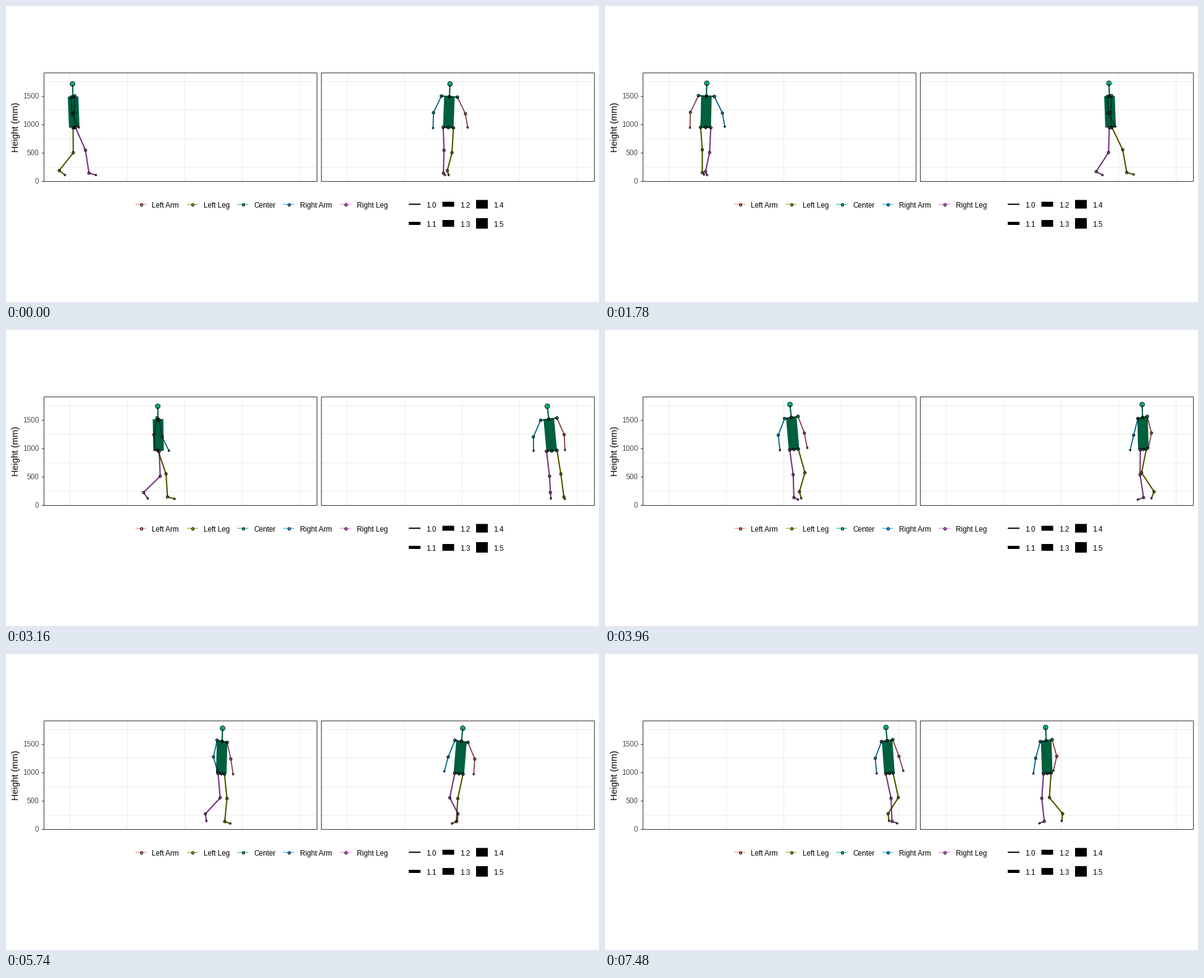
A matplotlib script that plays this animation: 960x480 px, repeating every 7500 ms.

```python
import numpy as np
import matplotlib.pyplot as plt
from matplotlib.animation import FuncAnimation
from matplotlib.collections import LineCollection
from matplotlib.patches import Rectangle

W, H, FRAMES, STEP = 960, 480, 375, 20
PX = 0.72  # points per pixel at 100 dpi
plt.rcParams["font.family"] = "Liberation Sans"

COLORS = {"Left Arm": "#F8766D", "Left Leg": "#A3A500", "Center": "#00BF7D",
          "Right Arm": "#00B0F6", "Right Leg": "#E76BF3"}

# Waypoints: seconds, x in left panel, x in right panel, heading, strides walked
WALK = np.array([(0, 110, 715.5, 13, 0.04), (1.78, 162.5, 818, 76, 1.51),
                 (3.16, 246.5, 883, 7, 2.58), (3.96, 305.5, 871, -55, 3.22),
                 (5.04, 328, 786, -87, 4.09), (6.42, 393, 711, 6, 5.22),
                 (7.48, 460, 715.5, -44, 6.16)])
SPEED = 80  # pixels per second
THIGH, SHANK, FOOT = 40.5, 37.5, 12
UPPER_ARM, FOREARM = 27, 25  # drop of the hanging arm
T = np.arange(FRAMES) * STEP / 1000


def curve(vs, slopes=None):
    """Cubic Hermite through the waypoint times."""
    ts = WALK[:, 0]
    m = np.gradient(vs, ts) if slopes is None else slopes
    i = np.clip(np.searchsorted(ts, T, side="right") - 1, 0, len(ts) - 2)
    h = ts[i + 1] - ts[i]
    u = (T - ts[i]) / h
    a = u * u * (3 - 2 * u)
    return (vs[i] * (1 - a) + vs[i + 1] * a
            + h * u * (1 - u) * (m[i] * (1 - u) - m[i + 1] * u))


def wave(phase, n=1):
    return np.cos(2 * np.pi * n * phase)


def drop(length, reach):
    """Height spanned by a rigid bone that reaches forward."""
    return np.sqrt(np.maximum(length ** 2 - reach ** 2, 1))


turns = np.radians(WALK[:, 3])
heading, phase = curve(turns), curve(WALK[:, 4])
lean = 5 * np.tanh(np.gradient(heading, T)) - 0.5  # into the turn, to the left
cos, sin = np.cos(heading), np.sin(heading)


def place(base, fwd, left, down):
    return base + np.column_stack([fwd * cos - left * sin, fwd * sin + left * cos,
                                   down + 0 * T])


# Trunk: a path on the floor plus a bob twice per stride
bob = 1.5 * wave(phase, 2)
pelvis = np.column_stack([curve(WALK[:, 1], SPEED * np.cos(turns)),
                          curve(WALK[:, 2], SPEED * np.sin(turns)),
                          195.3 - 0.2 * T + bob])
neck = place(pelvis, -1.5, lean, -50.2 - 0.4 * T)
head = place(neck, -0.7, lean / 2, -20.5 - 0.12 * T)


def arm(side, own):
    shoulder = place(neck, 0, 13.3 * side, 0.4 * lean * side)
    swing = wave(own + 0.02)
    elbow = place(shoulder, -4.5 * swing, 12.3 * side, UPPER_ARM)
    reach = 6.5 - 5.5 * swing
    return [shoulder, elbow, place(elbow, reach, side, drop(FOREARM, reach))]


def leg(side, own):
    """One leg; its cycle starts at heel strike."""
    hip = place(pelvis, 0, 8.5 * side, 0.15 * lean * side)
    thigh = 8 + 12 * wave(own - 0.91)
    reach = -1 + 23.5 * wave(own) + 5.3 * wave(own + 0.09, 2) - thigh
    knee = place(hip, thigh, -lean, drop(THIGH, thigh))
    ankle = place(knee, reach, -lean, drop(SHANK, reach))
    pitch = np.radians(15 + 65 * np.exp(4 * (wave(own - 0.66) - 1)))
    return [hip, knee, ankle,
            place(ankle, FOOT * np.cos(pitch), 0, FOOT * np.sin(pitch))]


l_arm, r_arm = arm(1, phase + 0.5), arm(-1, phase)
l_leg, r_leg = leg(1, phase + 0.5), leg(-1, phase)

ARM, LEG, TORSO = 1.6, 2, 17
BIG, MID, SMALL = 7.6, 4.2, 2.7
segments, dots = [], []  # (joint, joint, color, width) and (joint, color, size)


def chain(name, joints, width):
    color = COLORS[name]
    segments.extend((a, b, color, width) for a, b in zip(joints, joints[1:]))
    dots.extend((j, color, MID) for j in joints[:-1])
    dots.append((joints[-1], color, SMALL))


chain("Left Arm", l_arm, ARM)
chain("Left Leg", l_leg, LEG)
green = COLORS["Center"]
segments.append((neck, pelvis, green, TORSO))
for a, b in ((head, neck), (neck, l_arm[0]), (neck, r_arm[0]),
             (pelvis, l_leg[0]), (pelvis, r_leg[0])):
    segments.append((a, b, green, LEG))
    dots.extend([(a, green, BIG if a is head else MID), (b, green, MID)])
chain("Right Arm", r_arm, ARM)
chain("Right Leg", r_leg, LEG)

lines = np.stack([np.stack([a, b], 1) for a, b, _, _ in segments], 1)
points = np.stack([d[0] for d in dots], 1)

# Stage
fig = plt.figure(figsize=(W / 100, H / 100), dpi=100, facecolor="white")
ax = fig.add_axes([0, 0, 1, 1])
ax.set(xlim=(-0.5, W - 0.5), ylim=(H - 0.5, -0.5))
ax.axis("off")


def stroke(x, y, color, width=1):
    ax.plot(x, y, color=color, lw=width * PX, zorder=1, solid_capstyle="butt", snap=False)


def label(x, y, s, color="black", size=11.73, **kw):
    ax.text(x, y, s, color=color, fontsize=size * PX, va="baseline", **kw)


TOP, BOTTOM, WIDE = 108, 284, 442
for left in (61, 510):
    for k in range(5):
        stroke([left + 42 + 93 * k] * 2, [TOP, BOTTOM], "#EBEBEB")
    for k in range(4):
        stroke([left, left + WIDE], [round(261.3 - 46.4 * k)] * 2, "#EBEBEB")
    ax.add_patch(Rectangle((left, TOP), WIDE, BOTTOM - TOP, fill=False,
                           ec="#333333", lw=PX, zorder=6, snap=False))

for k in range(4):
    y = round(284.3 - 46.2 * k)
    stroke([57.5, 61], [y, y], "#333333")
    label(53, y + 4, str(500 * k), "#4D4D4D", ha="right")
label(19.5, 196, "Height (mm)", size=14.67, rotation=90, rotation_mode="anchor", ha="center")

for (name, color), x in zip(COLORS.items(), (218, 301, 383, 457, 549)):
    stroke([x - 9, x + 9], [321, 321], color)
    ax.scatter([x], [321], s=(4.2 * PX) ** 2, c=color, ec="black", lw=PX, zorder=3)
    label(x + 18, 326.5, name)

for n in range(6):
    x, y = 651.5 + 54.5 * (n // 2), 321 + 31 * (n % 2)
    stroke([x, x + 19], [y, y], "black", 2 + 3 * n)
    label(x + 28.5, y + 5.5, f"{1 + n / 10:.1f}")

# Walker in both panels: colored lines, dots, then a half-clear black pass
widths = [s[3] * PX for s in segments] * 2


def strokes(colors, z):
    lc = LineCollection([], colors=colors, linewidths=widths, capstyle="butt", zorder=z)
    lc.set_snap(False)
    ax.add_collection(lc, autolim=False)
    return lc


def both(p):
    return np.concatenate([p[..., [0, 2]], p[..., [1, 2]]])


paint = strokes([s[2] for s in segments] * 2, 3)
shade = strokes([(0, 0, 0, 0.5)], 5)
joints = ax.scatter(*both(points[0]).T, s=[(d[2] * PX) ** 2 for d in dots] * 2,
                    c=[d[1] for d in dots] * 2, ec="black", lw=0.9 * PX, zorder=4)


def draw(i):
    seg = both(lines[i])
    paint.set_segments(seg)
    shade.set_segments(seg)
    joints.set_offsets(both(points[i]))
    return paint, joints, shade


anim = FuncAnimation(fig, draw, frames=FRAMES, interval=STEP, repeat=True, repeat_delay=0)
plt.show()
```
